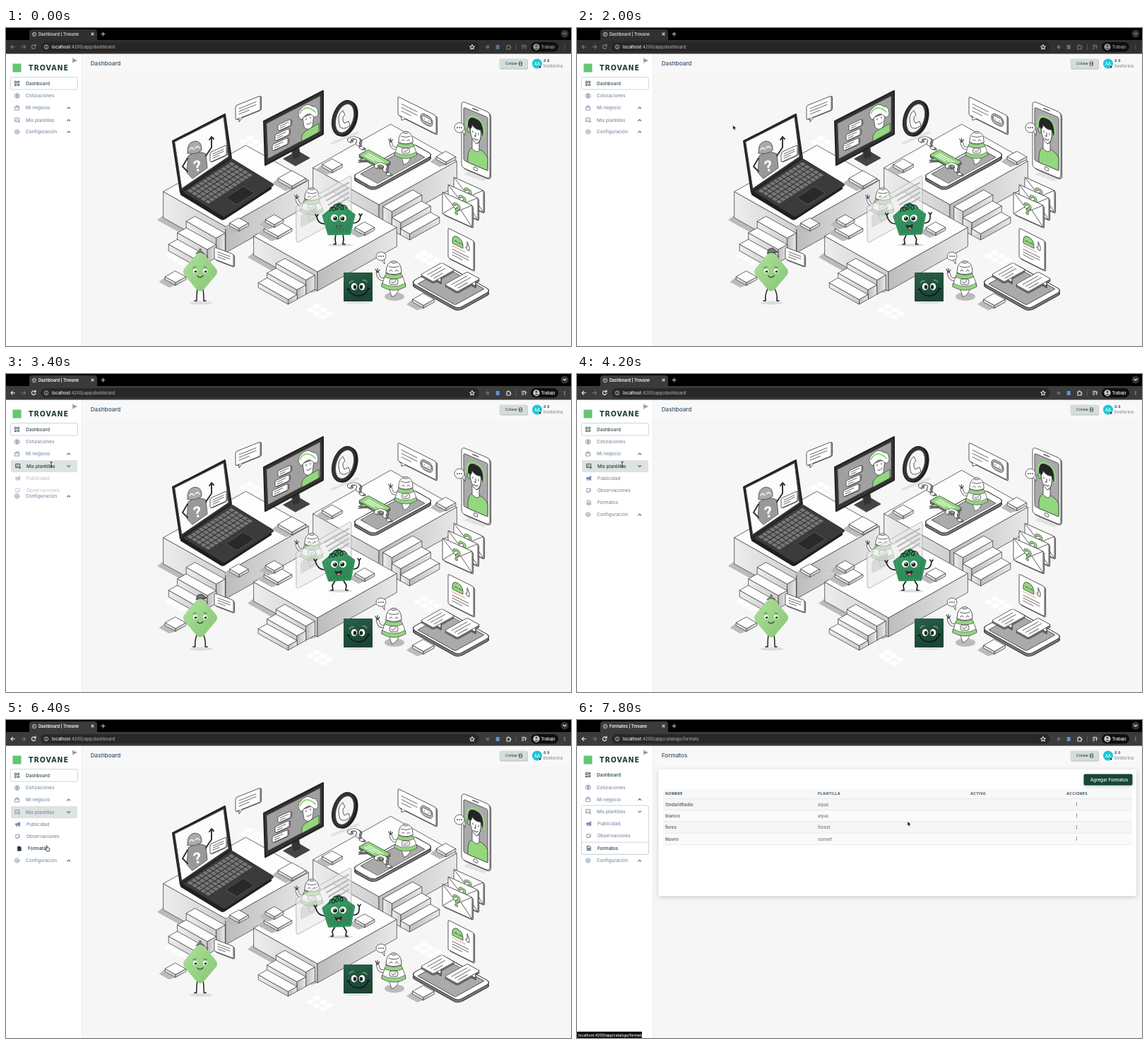
These frames come from a looping animation (800x450 px, 8 s). An HTML page:

```html
<!DOCTYPE html>
<html lang="es">
<head>
<meta charset="utf-8">
<title>Dashboard</title>
<style>
html, body { margin: 0; width: 100%; height: 100%; overflow: hidden; background: #f6f6f6; }
svg { display: block; width: 100vw; height: 100vh; font-family: Inter, sans-serif; }
</style>
</head>
<body>
<svg id="stage" viewBox="0 0 800 450"></svg>
<script>
const INK = '#444', GREEN = '#93d77f', SLOPE = .56;
const STEP = 200, LOOP = 8000;

// Drawing helpers
const rect = (x, y, w, h, fill, rx = 0, extra = '') =>
  `<rect x="${x}" y="${y}" width="${w}" height="${h}" rx="${rx}" fill="${fill}" ${extra}/>`;
const path = (d, stroke = INK, width = .8, fill = 'none') =>
  `<path d="${d}" stroke="${stroke}" stroke-width="${width}" fill="${fill}" stroke-linecap="round" stroke-linejoin="round"/>`;
const poly = (points, fill, stroke = INK, width = .8) => path('M' + points.join('L') + 'Z', stroke, width, fill);
const oval = (x, y, rx, ry, fill, extra = '') =>
  `<ellipse cx="${x}" cy="${y}" rx="${rx}" ry="${ry}" fill="${fill}" ${extra}/>`;
const text = (x, y, size, fill, value, weight = 500, extra = '') =>
  `<text x="${x}" y="${y}" font-size="${size}" fill="${fill}" font-weight="${weight}" ${extra}>${value}</text>`;
const group = (transform, body) => `<g transform="${transform}">${body}</g>`;
const repeat = (n, make) => Array.from({ length: n }, (_, i) => make(i)).join('');
const outline = (color = INK, width = .8) => `stroke="${color}" stroke-width="${width}"`;
const lines = (x, y, w, n, gap, color = '#666') =>
  repeat(n, i => path(`M${x} ${y + i * gap}h${i === n - 1 ? w * .6 : w}`, color, 1));
const dots = (x, y) => repeat(3, i => oval(x + i * 3, y, .9, .9, INK));

// Isometric block; x, y is the front corner of its top
function block(x, y, a, b, h) {
  const left = [x - a, y - a * SLOPE], right = [x + b, y - b * SLOPE];
  const down = ([px, py]) => [px, py + h];
  return poly([left, [x, y], [x, y + h], down(left)], 'url(#leftFace)')
    + poly([right, [x, y], [x, y + h], down(right)], 'url(#rightFace)')
    + poly([left, [x, y], right, [x + b - a, y - (a + b) * SLOPE]], '#fdfdfd');
}
const platform = (x, y, a, b, h) =>
  poly([[x - a, y - a * SLOPE + h - 4], [x - a - 9, y - a * SLOPE + h + 3], [x - 9, y + h + 3], [x, y + h]], '#bbb', 'none')
  + block(x, y, a, b, h);
const smallBox = (x, y, w) => platform(x, y + w * .25, w / 2, w / 2, 4);
const stairs = (x, y, side, h) => {
  const drop = h / 4;
  return repeat(3, i => {
    const k = i + 1;
    return block(x + side * 12.5 * k, y + 12.5 * k * SLOPE + drop * k,
      side < 0 ? 42 : 12.5, side < 0 ? 12.5 : 42, h - drop * k);
  });
};
// Upright sheet sheared by k, with a little thickness
const card = (x, y, w, h, k, body, fill = '#fff', rx = 2) => group(`matrix(1 ${k} 0 1 ${x} ${y})`,
  rect(1.6, .8, w, h, '#bbb', rx, outline()) + rect(0, 0, w, h, fill, rx, outline()) + body);
// Speech bubble lying flat; the axes matrix sets where its lines run
const flatBubble = (axes, x, y, w, h, tail, fill, ink) => {
  const shape = color => path(tail, INK, .9, color) + rect(0, 0, w, h, color, 2, outline());
  return group(`matrix(${axes} ${x} ${y + 2.5})`, shape('#777'))
    + group(`matrix(${axes} ${x} ${y})`, shape(fill) + lines(5, 5, w - 10, 3, (h - 9) / 2, ink));
};

const robotBody =
  path('M-6 15L-3 25Q4 24 7 15Z', INK, .8, '#fff')
  + path('M-10-8Q-15 0-17 10Q0 20 17 10Q15 0 10-8Z', INK, .8, '#fff')
  + path('M-16.2 6Q0 15 16.2 6L17 11Q0 21-17 11Z', INK, .7, GREEN)
  + path('M-10-8Q0-3 10-8L13-3Q0 3-13-3Z', INK, .7, GREEN)
  + rect(-6, 0, 12, 8, '#eee', 3, outline()) + path('M-3 4l2 2 4-4')
  + path('M-11-9Q-11-25 0-25Q11-25 11-9Q0-4-11-9Z', INK, .9, '#fff')
  + path('M-7-18Q0-15 7-18M-6-11q2-4 4 0M2-11q2-4 4 0', INK, .9)
  + oval(0, -24, 4, 1.6, '#ddd', outline());
const robotArm = path('M-14 0Q-21 2-23-9', INK, 4.4) + path('M-14 0Q-21 2-23-9', '#fff', 2.8)
  + path('M-23-9l-3-5M-23-9v-6M-23-9l3-4', INK, 1.2);
const robot = (id, x, y, s) => group(`translate(${x} ${y}) scale(${s})`, `<g id="${id}">${robotArm + robotBody}</g>`);

const laptop = () => {
  const keys = repeat(60, i => rect(5 + Math.floor(i / 12) * 6.3, 4 + i % 12 * 5.3, 5, 4.2, '#777', .6));
  return group('matrix(1 .61 -1 .65 318 190)', rect(-2, 0, 62, 71, '#1f1f1f', 3))
    + group('matrix(1 .61 -1 .65 318 184)', rect(0, 0, 62, 71, '#3b3b3b', 3, outline('#222')) + keys
      + rect(41, 23, 16, 25, '#292929', 1, outline('#666', .5)))
    + poly([[236, 160], [310, 122], [319, 184], [247, 233]], '#2e2e2e', '#222', 2)
    + poly([[239, 161], [308, 126], [315, 182], [249, 227]], '#fcfcfc')
    + path('M256 204L258 181Q269 172 283 178L285 198L264 213Z', INK, .8, '#999')
    + path('M257 184l-7 12 7 7M283 181l8-12v-15m-3 4l3-4 3 3', '#333', 2)
    + path('M257 177Q256 162 267 160Q278 160 277 173Q268 180 257 177Z', INK, .8, '#aaa')
    + path('M260 172q3-5 6 0M268 170q3-5 6 0', '#fff', 1.3)
    + text(265, 203, 21, '#fff', '?', 700, 'transform="rotate(-12 270 195)"')
    + card(289, 176, 23, 14, -.45, lines(4, 4, 15, 3, 3));
};

const monitor = () =>
  poly([[393, 185], [413, 174], [430, 184], [410, 195]], '#444', '#222')
  + poly([[404, 170], [414, 165], [417, 182], [407, 186]], '#333')
  + poly([[365, 132], [449, 89], [449, 150], [367, 194]], '#333', '#222', 2)
  + poly([[369, 135], [445, 96], [445, 146], [371, 185]], '#a0a0a0')
  + repeat(3, i => card(385 - i * 4, 137 + i * 14, 18 + i * 2, 9, -.45, lines(3, 3, 12, 2, 3)))
  + path('M419 160Q416 149 429 143L443 135V147Z', INK, .8, GREEN)
  + path('M420 127L422 140Q427 147 434 139L436 121Z', INK, .8, '#fff')
  + path('M418 130Q410 122 417 115Q426 104 434 111Q442 110 442 122Q439 129 434 124Q428 117 418 130Z', INK, .8, '#fff')
  + path('M416 121Q424 106 438 119', GREEN, 2)
  + path('M425 128v2M431 126v2M426 136q4 1 6-3', INK, 1);

const flatPhone = (x, y, w, h) => group(`matrix(1 .56 -1 .55 ${x} ${y + 4})`, rect(0, 0, w, h, '#777', 6, outline('#333', 1)))
  + group(`matrix(1 .56 -1 .55 ${x} ${y})`, rect(0, 0, w, h, '#fff', 6, outline('#333', 1))
    + (w > h ? rect(7, 3, w - 14, h - 6, '#aaa', 1, outline()) : rect(3, 9, w - 6, h - 18, '#aaa', 1, outline())));

const uprightPhone = () => card(645, 103, 40, 94, .42,
  rect(3, 8, 34, 75, '#aaa', 2, outline()) + path('M16 4h8', INK, 1.4) + oval(20, 88, 3, 2.5, '#fff', outline())
  + path('M9 83Q8 66 14 61L25 58Q35 59 37 66V83Z', INK, .8, GREEN)
  + path('M15 48v13q6 5 10-1V47Z', INK, .8, '#fff')
  + path('M12 29Q18 22 27 29Q29 46 21 52Q12 49 12 29Z', INK, .9, '#fff')
  + path('M10 37Q5 17 19 17Q33 16 30 37L27 30Q20 33 15 28Q14 35 10 37Z', INK, .8, '#252525')
  + path('M8 36Q6 15 20 15Q33 15 32 37', GREEN, 2.4) + oval(10, 37, 2.2, 4, GREEN, outline())
  + path('M16 36v2M24 36v2M20 37v5h-2M17 46q4 2 6-1', INK, 1), '#fff', 5);

const envelope = i => card(634 - i * 8, 211 + i * 10.5, 42, 31, .45,
  path('M0 0L21 18L42 0M0 31L16 14M42 31L26 14') + text(14, 23, 22, GREEN, '?', 700, outline('#333', .6)));

const questionMark = (x, y) => group(`matrix(.95 -.3 .7 .65 ${x} ${y})`,
  text(1, 2, 35, '#999', '?', 600, outline()) + text(0, 0, 35, '#fff', '?', 600, outline()));

const tiles = (x, y) => group(`matrix(1 .56 -1 .56 ${x} ${y})`,
  repeat(6, i => rect(i % 3 * 9, Math.floor(i / 3) * 9, 7, 7, '#fff', 1)));

const scene = () =>
  [[345, 152], [592, 314], [440, 390], [620, 216], [240, 313]].map(p => tiles(...p)).join('')
  + platform(528, 250, 93, 110, 35) + stairs(534, 244, 1, 35)
  + platform(311, 281, 88, 117, 37) + stairs(310, 281, -1, 37)
  + platform(441, 345, 90, 112, 27) + stairs(437, 343, -1, 27)
  + card(325, 110, 35, 20, -.4, lines(5, 6, 24, 3, 4) + path('M5 20v5l5-5', INK, .8, '#fff'))
  + monitor() + laptop()
  + path('M462 163L498 148', '#e2e2e2', 4)
  + group('rotate(18 480 128)', oval(481.5, 128, 16, 26, '#222') + oval(478.5, 128, 16, 26, '#333', outline('#111'))
    + oval(479.5, 128, 12, 21, '#f4f4f4', outline()))
  + path('M473 121Q469 127 473 140Q478 145 487 138L485 132L479 135Q476 131 477 126L480 123L477 117Z', INK, .9, '#fff')
  + card(555, 97, 54, 26, .5, lines(5, 8, 22, 3, 5) + path('M5 26v5l6-5', INK, .8, '#fff')
    + rect(32, 6, 17, 14, '#bbb', 6, outline()) + rect(34, 9, 13, 7, '#fff', 3, outline()) + path('M37 13h1M43 13h1'))
  + smallBox(405, 214, 39) + smallBox(330, 277, 26) + smallBox(462, 194, 28) + smallBox(623, 183, 27)
  + smallBox(385, 285, 39) + smallBox(380, 272, 25) + smallBox(508, 283, 27)
  + smallBox(240, 353, 29) + smallBox(591, 385, 30)
  + flatPhone(575, 163, 30, 85) + questionMark(497, 174)
  + flatBubble('1 .56 -1 .56', 513, 172, 32, 14, 'M7 14v7l6-7', GREEN, '#fff') + questionMark(535, 211)
  + robot('phoneRobot', 566, 170, .93)
  + poly([[648, 207], [676, 217], [686, 211], [660, 200]], '#e2e2e2', 'none') + uprightPhone()
  + path('M646 146l4 6v-9', INK, .8, '#fff') + oval(642, 141, 7, 7, '#fff', outline()) + dots(639, 141)
  + repeat(3, envelope)
  + card(626, 283, 36, 42, .5, path('M6 18Q5 6 13 6Q22 6 21 18Z', INK, .8, GREEN)
    + path('M9 14q2-3 4 0M15 14q2-3 4 0') + path('M27 13v-7l3 6v5q-3 2-5-2Z', INK, .8, '#fff')
    + path('M6 22h18', '#e89090', 1.2) + lines(6, 27, 23, 3, 4))
  + flatPhone(620, 334, 67, 47)
  + flatBubble('1 -.56 1 .56', 587, 349, 30, 18, 'M5 18v6l6-6', '#fff', '#666')
  + flatBubble('1 -.56 1 .56', 621, 363, 32, 18, 'M20 18v6l6-6', '#fff', '#666')
  + card(295, 310, 27, 17, .38, lines(5, 5, 17, 3, 3.5))
  + robot('glassRobot', 433, 249, .93)
  + path('M411 253L486 210Q489 208 489 212V262L414 303Q411 304 411 300Z', '#aaa', .8, 'rgba(235,235,235,.66)')
  + repeat(4, i => path(`M${451 + i * 3} ${238 + i * 6}L485 ${219 + i * 7}`, '#bbb', 2.4))
  + rect(417, 265, 24, 18, 'rgba(190,190,190,.45)', 3, 'transform="skewY(-28)" transform-origin="417 265"')
  + oval(550, 380, 14, 6, '#bbb') + robot('floorRobot', 549, 356, 1)
  + path('M532 328l4 6v-7', INK, .8, '#fff') + oval(531, 323, 7, 6, '#fff', outline())
  + `<g id="bubbleDots">${dots(528, 323)}</g>`
  + '<g id="mascots"></g>';

// Mascots at step n
const eye = (x, y, r, look) => oval(x, y, r, r, '#fff') + oval(x + look, y + .5, r * .58, r * .58, '#16231d') + oval(x + look - .7, y - .8, .9, .9, '#fff');
function mascots(n) {
  const wave = (period, shift = 0) => Math.cos(2 * Math.PI * (n - shift) / period);
  const squat = Math.max(0, wave(25, 13)), narrow = Math.max(0, wave(12.5)), sway = wave(7);
  const foot = 5 + squat * 4, step = 5 + 4 * (1 - narrow);
  const diamond = oval(276, 389, 16, 2.5, '#ddd')
    + [-1, 1].map(s => path(`M${275 + s * 4} 367Q${275 + s * (5 + squat * 6)} 377 ${275 + s * foot} 386h${s * 3}`, '#222', 1.5)).join('')
    + path('M269 319Q275 312 281 319Z', '#555', .8, '#777')
    + (squat > .2 ? path('M270 318Q269 311 278 312L284 317Z', '#333', 1, '#777') : oval(275, 314, 2, 2.2, '#777'))
    + path('M269 321Q275 315 281 321L297 340Q301 345 297 350L281 369Q275 376 269 369L253 350Q249 345 253 340Z', 'none', 0, 'url(#lime)')
    + [268, 282].map(x => eye(x, 344, 3.1, .4)).join('') + path('M271 351q4 4 8-.5', '#28482b', 1.2)
    + path('M265 339l4-1M280 338l4 1', '#28482b', .8);
  const handY = 266 + sway;
  const pentagon = oval(473, 307, 18, 2, '#ddd')
    + [-1, 1].map(s => path(`M${472 + s * 5} 291L${472 + s * (step + 1)} 299L${472 + s * step} 306h${s * 3}`, '#1b1b1b', 1.7)).join('')
    + path(`M452 277Q442 278 ${440 - (1 - narrow) * 2} ${handY}m-2-3l2 3 2-3`, '#1b1b1b', 1.6)
    + path(`M492 276Q501 276 ${501 + sway} ${handY - 1}m-2-3l2 3 2-3`, '#1b1b1b', 1.6)
    + group(`rotate(${sway * 1.2} 472 273)`,
      path('M471 248L493 264L487 291L457 292L449 266Z', '#35915e', 3, 'url(#jade)')
      + repeat(8, i => path(`M${456 + i * 4.4} ${264 + i % 2 * 3}v25`, '#2b8054', .7))
      + path('M458 260q0-8 6-6t-1 5q-4-1 1-8 6-5 7 3-3 6-4 1 2-8 8-5 5 6 0 7-4-2 0-6 5-2 8 4', '#172a20', 1.2)
      + eye(465, 269, 5, 1) + eye(477, 269, 5, -.7)
      + (narrow > .6 ? path('M468 280q4 2 7-1-1 5-3.5 5t-3.5-4Z', '#333', .7, '#777')
        : path('M466 279q5 2.5 9-1 0 7-4 7t-5-6Z', '#222', .8, '#26302a') + oval(471, 283.5, 2.4, 1.3, '#e58c91')));
  const brow = wave(9);
  const square = oval(498, 389, 17, 1.3, '#e0e0e0')
    + rect(478, 346, 41, 41, 'url(#forest)', 1)
    + oval(493, 366, 4.2, 5, '#fff') + oval(504, 366, 4.2, 5, '#fff')
    + oval(494, 366.5, 2.2, 3, '#13271e') + oval(503, 366.5, 2.2, 3, '#13271e')
    + path(`M486 ${360 + brow}q3-4 6-3M505 ${357 - brow * .4}q5 0 6 3`, '#6fae80', 1.3)
    + path('M485 370Q489 379 499 379T513 369M483 370l3-1M512 368l3 1', '#0d1b14', 1.6);
  return diamond + pentagon + square;
}

// Browser window
function chrome(active, page) {
  const ink = active ? '#eee' : '#7e7e7e', bar = active ? '#3b3b3b' : '#303030';
  const nav = (d, color = ink) => path(d, color, 1.1);
  return rect(0, 0, 800, 17, '#000') + rect(33, 2, 96, 20, bar, 4) + rect(0, 17, 800, 19.5, bar)
    + rect(49, 20, 621, 13.5, active ? '#282828' : '#262626', 6.7)
    + oval(40, 9, 2.8, 2.8, 'none', outline('#ccc', .8)) + path('M37.5 8l3 1-1 2M40 6.5l2 2', '#ccc', .7)
    + text(46, 11.2, 5.7, active ? '#fff' : '#d8d8d8', `${page ? 'Formatos' : 'Dashboard'} | Trovane`, 600)
    + nav('M121 7l3 3M124 7l-3 3', '#ddd') + nav('M135 8.5h5M137.5 6v5', '#bbb')
    + oval(791, 8, 5.5, 5.5, '#333') + nav('M789 7l2 2 2-2')
    + nav('M12.5 26.8h-5.5l2.3-2.3M7 26.8l2.3 2.3') + nav('M22 26.8h5.5l-2.3-2.3M27.5 26.8l-2.3 2.3', '#777')
    + nav('M41.5 25a2.8 2.8 0 1 0 .3 2.5M42 23v2.5h-2.5')
    + oval(57, 26.8, 2.8, 2.8, 'none', outline('#ccc', .8)) + path('M57 26.5v1.8M57 25v.1', '#ccc', .8)
    + text(65, 29, 6, '#a5a5a5', `<tspan fill="#f4f4f4">localhost</tspan>:4200/app/${page ? 'catalogs/formats' : 'dashboard'}`, 500)
    + nav('M660 23.6l1 2.2 2.4.2-1.8 1.6.5 2.4-2.1-1.3-2.1 1.3.5-2.4-1.8-1.6 2.4-.2Z', '#ddd')
    + oval(682, 27, 2.4, 2.4, '#666') + rect(693.7, 24, 5, 6, active ? '#5b93dc' : '#55749a', .5)
    + nav('M709 25h1.5q.8-2.5 1.6 0h1.8v1.8q2.3.7 0 1.6V30H709Z')
    + nav('M730.5 24.5h5M730.5 26.7h3M730.5 29h2M735.5 29v-3h1.5') + path('M722.5 23v8', '#666', .7)
    + rect(743, 20, 39, 13.5, '#0e0e0e', 6.7) + oval(751, 26.8, 4.6, 4.6, active ? '#cfcfcf' : '#999')
    + oval(751, 25.3, 1.6, 1.7, '#555') + path('M748 30q3-4 6 0Z', 'none', 0, '#555')
    + text(757.5, 29, 5.6, active ? '#fff' : '#aaa', 'Trabajo', 500)
    + repeat(3, i => oval(791, 24.8 + i * 2, .65, .65, ink));
}

// Side menu
const ICONS = {
  grid: 'M-3-3h2v3h-2ZM1-3h2v2h-2ZM-3 2h2v1h-2ZM1 1h2v2h-2Z',
  coin: 'M3.3 0A3.3 3.3 0 1 1-3.3 0A3.3 3.3 0 1 1 3.3 0M1-1.5h-2v1.4h2v1.6h-2M0-2.2v4.4',
  bag: 'M-3-1h6v4h-6ZM-1.7-1v-2h3.4v2',
  picture: 'M3 0v-3h-6v5h3M-2 1l2-2 1 1M1 2h3M2.5.5v3',
  horn: 'M-3-1h2l4-2v6l-4-2h-2ZM-2 1v2h1',
  note: 'M-2.5-2.5h5v3l-2 2h-3ZM.5 2.5v-2h2',
  file: 'M-2-3h3l1.5 1.5v4.5h-4.5ZM-.8 0h2M-.8 1.4h2',
  gear: 'M0-3.2L2.8-1.6V1.6L0 3.2L-2.8 1.6V-1.6ZM1.2 0A1.2 1.2 0 1 1-1.2 0A1.2 1.2 0 1 1 1.2 0'
};
const chevron = (y, down) => path(`M86.7 ${y + (down ? -1 : 1)}l2 ${down ? 2 : -2} 2 ${down ? -2 : 2}`, '#63708e', 1.1);
const item = (icon, label, y, { x = 28, color = '#7f8ba7', filled = false } = {}) =>
  group(`translate(${x - 12.3} ${y})`, path(ICONS[icon], color, .9, filled ? color : 'none'))
  + text(x, y + 2.3, 6.5, color, label, 500);
const sidebarRow = (y, h) => rect(6.5, y, 95, h, '#fff', 2, outline('#c5ccd1'));
function sidebar({ open, hover, hot, file, page }) {
  const dark = '#1d3d37', up = page ? .7 : 0, drop = open * 52;
  let out = rect(0, 36.5, 107.5, 414, '#fff') + path('M107.5 37V450', '#e8e8e8', .7)
    + rect(9.5, 50.5, 12, 12, '#63c673')
    + text(32, 60, 9.6, dark, 'TROVANE', 700, 'font-family="DejaVu Sans, sans-serif" letter-spacing=".9"')
    + path('M95 43v6M100 46h-4l1.5-1.5M96 46l1.5 1.5', '#333', .8);
  if (page) out += sidebarRow(121, 69) + sidebarRow(173, 17);
  else out += sidebarRow(69.5, 17.5) + (hover ? rect(7, 122, 94, 17, '#dce3e0', 1.5) : '');
  out += item('grid', 'Dashboard', 78.3 - up, { color: page ? dark : '#33474c' })
    + item('coin', 'Cotizaciones', 96 - up)
    + item('bag', 'Mi negocio', 113 - up) + chevron(113 - up, false)
    + item('picture', 'Mis plantillas', 130.3 - up, { color: hot ? dark : undefined, x: hot ? 29 : 28 })
    + chevron(130.5 - up, open)
    + item('gear', 'Configuración', 147 + drop) + chevron(147 + drop, false);
  if (open) out += `<g opacity="${open}">` + item('horn', 'Publicidad', 147.5 - up, { x: 29, filled: true })
    + item('note', 'Observaciones', 164.7 - up, { x: 29 })
    + (open === 1 ? item('file', 'Formatos', 182 - up, { x: file && !page ? 31 : 29, color: file ? dark : undefined, filled: file && !page }) : '') + '</g>';
  return out;
}

const header = title => rect(108, 36.5, 692, 28.5, '#f8f8f9') + text(119.7, 53.2, 8.2, '#35506b', title, 500)
  + rect(699, 44.5, 40, 14, '#bbb', 2) + rect(698.5, 43.5, 40, 14, '#d5dcda', 2)
  + text(707, 52.4, 5, '#25463d', 'Cotizar', 500) + rect(726.5, 48, 4, 5, 'none', .5, outline('#25463d', .9)) + path('M727 50.5h3', '#25463d', .7)
  + oval(752, 50.5, 7, 7, '#12cbd8') + text(747.9, 52.7, 5.8, '#fff', 'AA', 500) + oval(756, 55, 1.9, 1.9, '#234', outline('#fff', .6))
  + text(761, 48.3, 6.2, '#4d5969', 'a a', 600) + text(761, 56.3, 6.2, '#8b93a0', 'bvelorina', 500);

const formats = () => {
  const rows = [['OndarilRadio', 'aqua'], ['bianco', 'aqua'], ['fores', 'forest'], ['Nuvro', 'sunset']];
  const heads = [['NOMBRE', 125], ['PLANTILLA', 341], ['ACTIVO', 557], ['ACCIONES', 693]];
  return rect(115.5, 70, 676.5, 179, '#fff', 2, 'filter="url(#shadow)"')
    + rect(717.5, 76.5, 69, 16, '#164637', 2, 'filter="url(#shadow)"') + text(727, 86.6, 6.2, '#fff', 'Agregar Formatos', 500)
    + rect(122, 98, 664, 13, '#f8f8f8')
    + heads.map(([label, x]) => text(x, 106.4, 5.2, '#3b526d', label, 700, 'letter-spacing=".35"')).join('')
    + rows.map(([name, theme], i) => {
      const y = 111.5 + i * 16.2;
      return rect(122, y, 664, 16.2, i % 2 ? '#fafafa' : '#f6f6f6') + path(`M122 ${y}h664`, '#dfe2e4', .7)
        + text(125, y + 10.4, 6.3, '#6d7684', name, 700) + text(341, y + 10.4, 6.3, '#747b86', theme, 500)
        + repeat(3, k => oval(707.5, y + 5.8 + k * 1.9, .65, .65, '#556'));
    }).join('') + path('M122 176.3h664', '#dfe2e4', .7);
};

const gradient = (id, from, to, angle = 0) => `<linearGradient id="${id}" gradientTransform="rotate(${angle})"><stop stop-color="${from}"/><stop offset="1" stop-color="${to}"/></linearGradient>`;
const stage = document.getElementById('stage');
stage.innerHTML = '<defs>' + gradient('leftFace', '#ededed', '#cfcfcf') + gradient('rightFace', '#bdbdbd', '#e8e8e8')
  + gradient('lime', '#afe29a', '#91cd80', 45) + gradient('jade', '#3fa56c', '#2f8a58', 60) + gradient('forest', '#2a6049', '#1c4535', 70)
  + '<filter id="shadow" x="-10%" y="-20%" width="120%" height="150%"><feDropShadow dx="0" dy="2" stdDeviation="3" flood-opacity=".17"/></filter></defs>'
  + rect(0, 0, 800, 450, '#f6f6f6')
  + `<g id="home">${header('Dashboard') + scene()}</g><g id="formats">${header('Formatos') + formats()}</g>`
  + '<g id="sidebar"></g><g id="chrome"></g>'
  + `<g id="status">${rect(0, 441, 92, 9, '#111', 1) + text(2, 447.5, 5.1, '#fff', 'localhost:4200/app/catalogs/formats', 500)}</g>`
  + '<g id="cursor"></g>';
const $ = id => document.getElementById(id);

const POINTERS = {
  arrow: path('M0-2.5V4l1.6-1.3 1 2.2 1.2-.6-1-2 2-.2Z', '#fff', .6, '#111'),
  beam: path('M-1.3-3.5q1.3 0 1.3 1v5q0 1-1.3 1M1.3-3.5Q0-3.5 0-2.5M0 2.5q0 1 1.3 1', '#222', .9),
  hand: path('M-1.5-3.5q1-1 1.2.2V-1l3 .8q.8.3.6 1.5L2.7 4H-1L-3 1q0-1.2 1.5 0Z', '#222', .8, '#fff')
};
// step, x, y
const TRACK = [[3, 770, 62], [6, 517, 113], [9, 300, 148], [12, 62, 124], [13, 58, 121], [15, 64, 128],
  [28, 64, 127], [30, 60, 160], [32, 58.5, 181.5], [34, 58.5, 181.5], [36, 200, 168], [38, 440, 149], [39, 468, 146]];
function pointer(n) {
  if (n < TRACK[0][0]) return '';
  const i = Math.max(1, TRACK.findIndex(p => p[0] >= n));
  const [n0, x0, y0] = TRACK[i - 1], [n1, x1, y1] = TRACK[i];
  const f = (n - n0) / (n1 - n0);
  const kind = n >= 15 && n < 30 ? 'beam' : n >= 30 && n < 35 ? 'hand' : 'arrow';
  return group(`translate(${x0 + (x1 - x0) * f} ${y0 + (y1 - y0) * f})`, POINTERS[kind]);
}

function draw(n) {
  const page = n >= 34;
  const show = (id, on) => $(id).setAttribute('display', on ? 'inline' : 'none');
  show('home', !page); show('formats', page); show('status', n >= 33);
  $('chrome').innerHTML = chrome(n >= 15, page);
  $('sidebar').innerHTML = sidebar({ open: n < 17 ? 0 : n < 18 ? .5 : 1, hover: n >= 15, hot: n >= 15 && n < 30, file: n >= 31, page });
  $('mascots').innerHTML = mascots(n);
  ['phoneRobot', 'glassRobot', 'floorRobot'].forEach((id, i) =>
    $(id).setAttribute('transform', `translate(0 ${Math.sin(2 * Math.PI * n / 10 + i * 2).toFixed(2)})`));
  $('bubbleDots').setAttribute('opacity', n % 14 === 13 ? .45 : 1);
  $('cursor').innerHTML = pointer(n);
}

let last = -1;
function tick() {
  const n = Math.floor(performance.now() % LOOP / STEP);
  if (n !== last) draw(last = n);
  requestAnimationFrame(tick);
}
tick();
</script>
</body>
</html>
```
